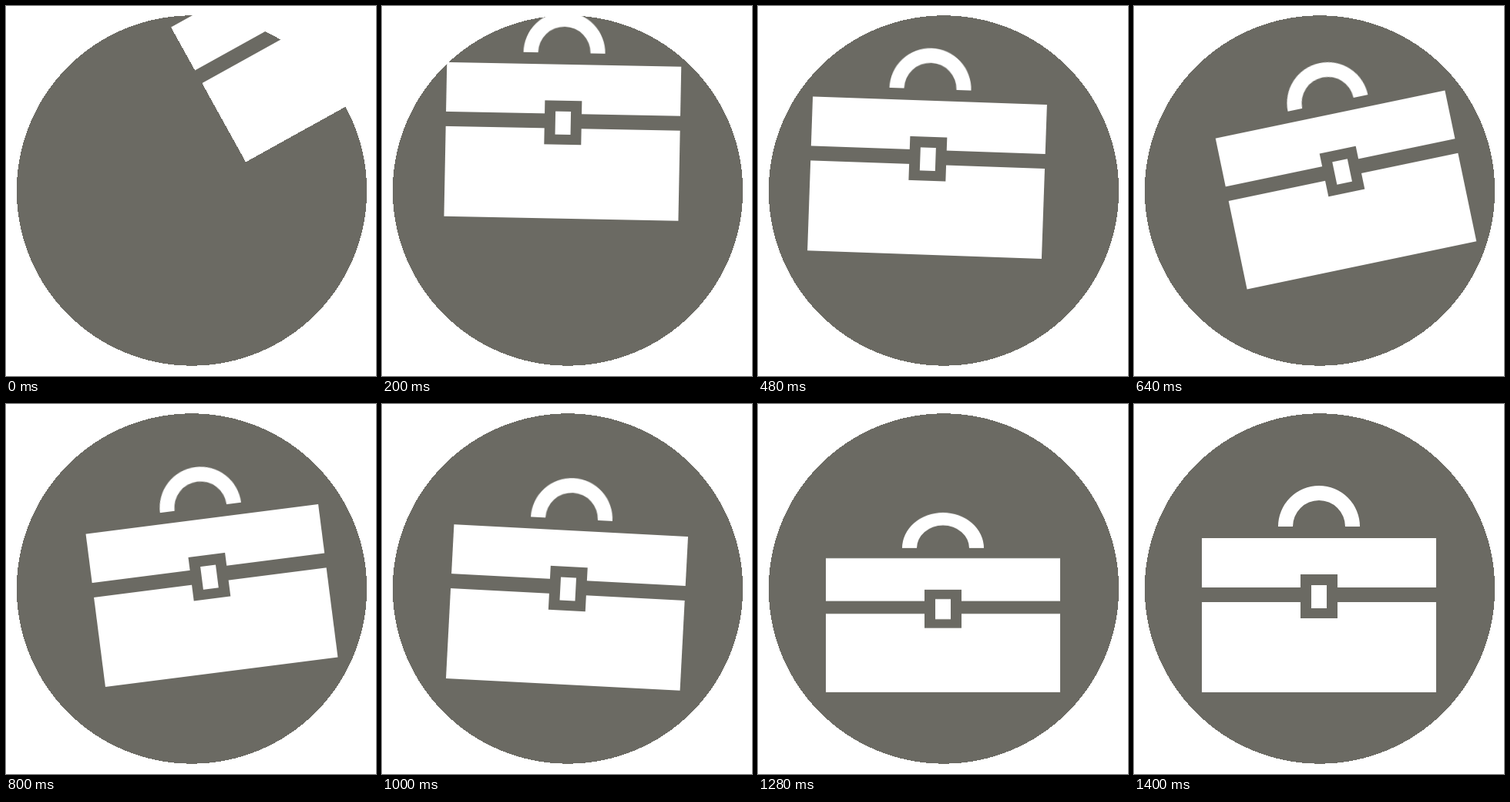
These frames come from a looping animation (480x480 px, 3 s). An HTML page without scripts:

```html
<!DOCTYPE html>
<html lang="en">
<head>
<meta charset="utf-8">
<title>Briefcase</title>
<style>
  html, body { margin: 0; width: 100%; height: 100%; overflow: hidden; background: #fff; }
  svg { display: block; width: 100vw; height: 100vh; }
  .disc { fill: #6b6a63; shape-rendering: crispEdges; }
  .case { fill: #fff; }

  /* 25 poses a second: one or two held poses per keyframe */
  .fall { animation: fall 3s steps(2) -1ms infinite; }
  .squash { transform-origin: 0 100px; animation: squash 3s step-end -1ms infinite; }

  @keyframes fall {
    0%      { transform: translate(395.5px, 41.3px) rotate(-29deg); }
    2.667%  { transform: translate(321.5px, 108.9px) rotate(-15.2deg); }
    5.333%  { transform: translate(257.4px, 159.3px) rotate(-3.2deg); }
    8%      { transform: translate(211.3px, 192.3px) rotate(5.4deg); }
    10.667% { transform: translate(189px, 208px) rotate(9.3deg); animation-timing-function: step-end; }
    12%     { transform: translate(187.5px, 212px) rotate(9.7deg); animation-timing-function: step-end; }
    13.333% { transform: translate(193px, 215.5px) rotate(8.2deg); }
    16%     { transform: translate(219.5px, 222.7px) rotate(2deg); }
    18.667% { transform: translate(252px, 232px) rotate(-6.5deg); }
    21.333% { transform: translate(275px, 238.5px) rotate(-11.8deg); animation-timing-function: step-end; }
    22.667% { transform: translate(279px, 241px) rotate(-12.3deg); animation-timing-function: step-end; }
    24%     { transform: translate(278px, 243.5px) rotate(-11.3deg); }
    26.667% { transform: translate(267px, 248.5px) rotate(-7.3deg); }
    29.333% { transform: translate(254px, 255px) rotate(-2.6deg); }
    32%     { transform: translate(243px, 261px) rotate(1.8deg); animation-timing-function: step-end; }
    33.333% { transform: translate(240px, 264px) rotate(3deg); animation-timing-function: step-end; }
    34.667% { transform: translate(238.5px, 266.5px) rotate(3.6deg); }
    37.333% { transform: translate(239.6px, 271px) rotate(1.2deg); animation-timing-function: step-end; }
    38.667%, 100% { transform: translate(240px, 274px) rotate(0deg); }
  }

  @keyframes squash {
    0%, 38.667%   { transform: scaleY(1); }
    40%, 45.333%  { transform: scaleY(.966); }
    41.333%, 44%  { transform: scaleY(.904); }
    42.667%       { transform: scaleY(.87); }
    46.667%, 100% { transform: scaleY(1); }
  }
</style>
</head>
<body>
<svg viewBox="0 0 480 480">
  <circle class="disc" cx="241" cy="239.5" r="227.2"/>
  <g class="fall">
    <g class="case squash">
      <path d="M-53-115A53 53 0 0 1 53-115H34A34 34 0 0 0-34-115Z"/>
      <path d="M-152-100H152V-36H24V-53H-24V-36H-152Z"/>
      <path d="M-152-17H-24V4H24V-17H152V100H-152Z"/>
      <rect x="-10" y="-39" width="20" height="30"/>
    </g>
  </g>
</svg>
</body>
</html>
```
